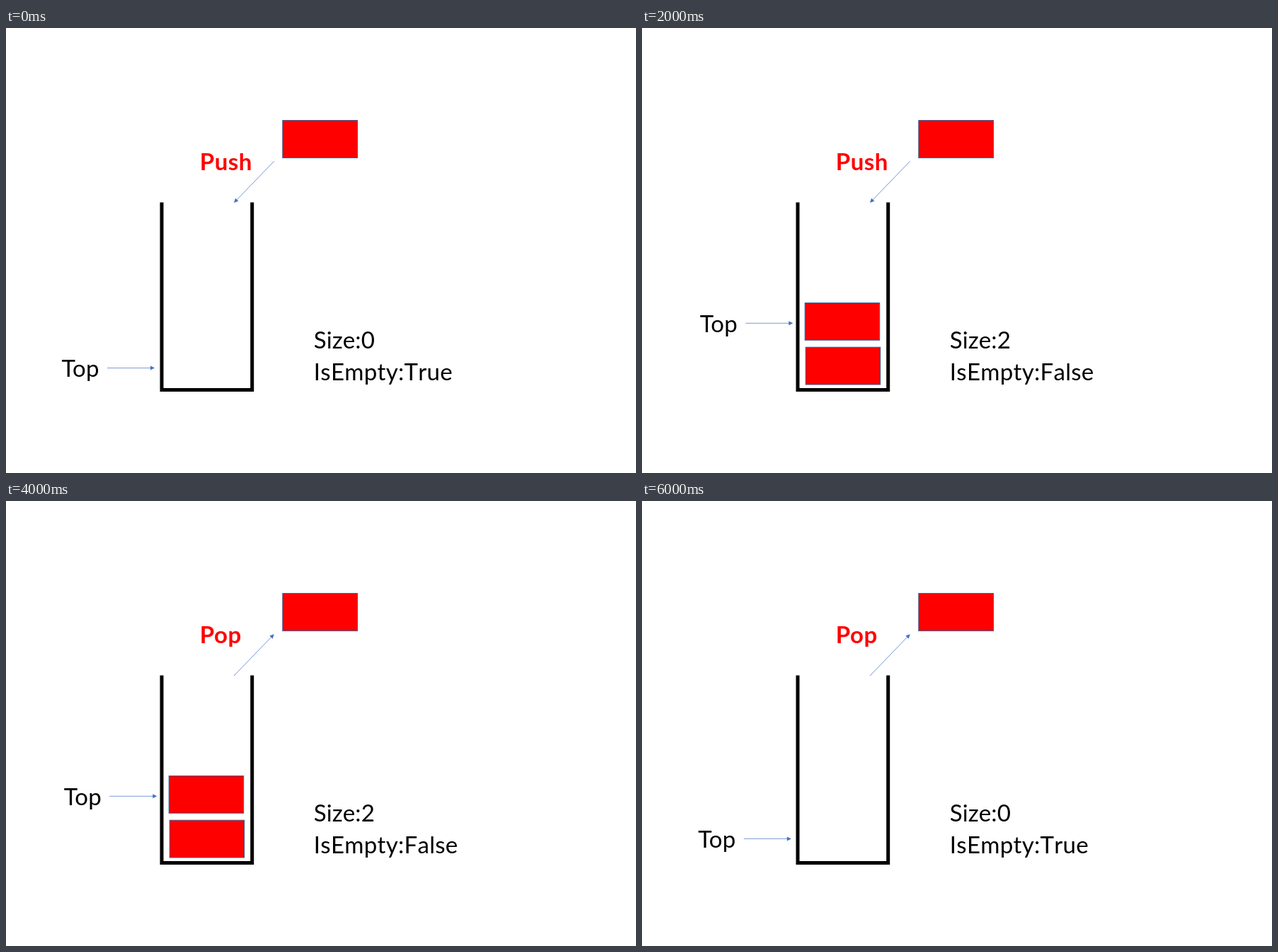
Animation of 890x629 px, one loop 7000 ms. Source, as an HTML page:

```html
<!DOCTYPE html>
<html lang="en">
<head>
<meta charset="utf-8">
<title>Stack push and pop</title>
<style>
  html, body { margin: 0; width: 100%; height: 100%; overflow: hidden; background: #fff; }
  svg { display: block; width: 100%; height: 100%; }
  text { font: 33px Lato, sans-serif; letter-spacing: .2px; }
  #action { font-weight: 700; fill: #f00; letter-spacing: .5px; }
  #empty { font-kerning: none; letter-spacing: .3px; }
  .block { fill: #f00; stroke: #2f5f97; stroke-width: 1; }
  .arrow line { stroke: #4472c4; stroke-width: .7; }
  .arrow path { fill: #4472c4; }
</style>
</head>
<body>
<svg viewBox="0 0 890 629">
  <rect width="890" height="629" fill="#fff"/>
  <path d="M220 246.5V511.5H347.7V246.5" fill="none" stroke="#000" stroke-width="5"/>
  <rect class="block" x="390.8" y="130.6" width="105.7" height="53"/>
  <g id="stack">
    <rect class="block" x="231.2" y="451.2" width="105.5" height="52.8"/>
    <rect class="block" x="230.2" y="388.6" width="105.5" height="52.6"/>
    <rect class="block" x="230.2" y="325.5" width="105.5" height="52.8"/>
  </g>
  <text id="action" x="273.8" y="200.5"></text>
  <g class="arrow" id="move"><line/><path/></g>
  <g id="top">
    <text x="78.4" y="493">Top</text>
    <g class="arrow" id="pointer"><line/><path/></g>
  </g>
  <text id="size" x="434.8" y="453"></text>
  <text id="empty" x="434.8" y="498"></text>
</svg>
<script>
  const STEP = 1000;
  const HEAD = 6;

  // Stack size, action and offset of the "Top" pointer for each step
  const steps = [
    { size: 0, action: "Push", top: [0, 0] },
    { size: 1, action: "Push", top: [0, 0] },
    { size: 2, action: "Push", top: [3.3, -63.3] },
    { size: 3, action: "Push", top: [3.3, -126.2] },
    { size: 2, action: "Pop", top: [3.3, -63.3] },
    { size: 1, action: "Pop", top: [0.8, -3.2] },
    { size: 0, action: "Pop", top: [0.8, -3.2] }
  ];

  const byId = id => document.getElementById(id);
  const blocks = [...byId("stack").children];

  function setAttrs(el, attrs) {
    for (const key in attrs) el.setAttribute(key, attrs[key]);
  }

  function drawArrow(group, x1, y1, x2, y2) {
    const [line, head] = group.children;
    const length = Math.hypot(x2 - x1, y2 - y1);
    const angle = Math.atan2(y2 - y1, x2 - x1) * 180 / Math.PI;
    setAttrs(group, { transform: `translate(${x1} ${y1}) rotate(${angle})` });
    setAttrs(line, { x1: 0, y1: 0, x2: length - HEAD + 1, y2: 0 });
    setAttrs(head, { d: `M${length} 0l${-HEAD} ${-HEAD / 2}v${HEAD}z` });
  }

  function render(ms) {
    const { size, action, top } = steps[Math.floor(ms / STEP) % steps.length];
    blocks.forEach((block, i) => setAttrs(block, { visibility: i < size ? "visible" : "hidden" }));
    byId("action").textContent = action;
    byId("size").textContent = "Size:" + size;
    byId("empty").textContent = "IsEmpty:" + (size ? "False" : "True");
    setAttrs(byId("top"), { transform: `translate(${top})` });
    if (action === "Push") drawArrow(byId("move"), 378.7, 188.3, 322, 247);
    else drawArrow(byId("move"), 322, 247, 378.7, 188.3);
  }

  drawArrow(byId("pointer"), 143, 480.6, 210, 480.6);

  const start = performance.now();
  function tick() {
    render(performance.now() - start);
    requestAnimationFrame(tick);
  }
  tick();
</script>
</body>
</html>
```
